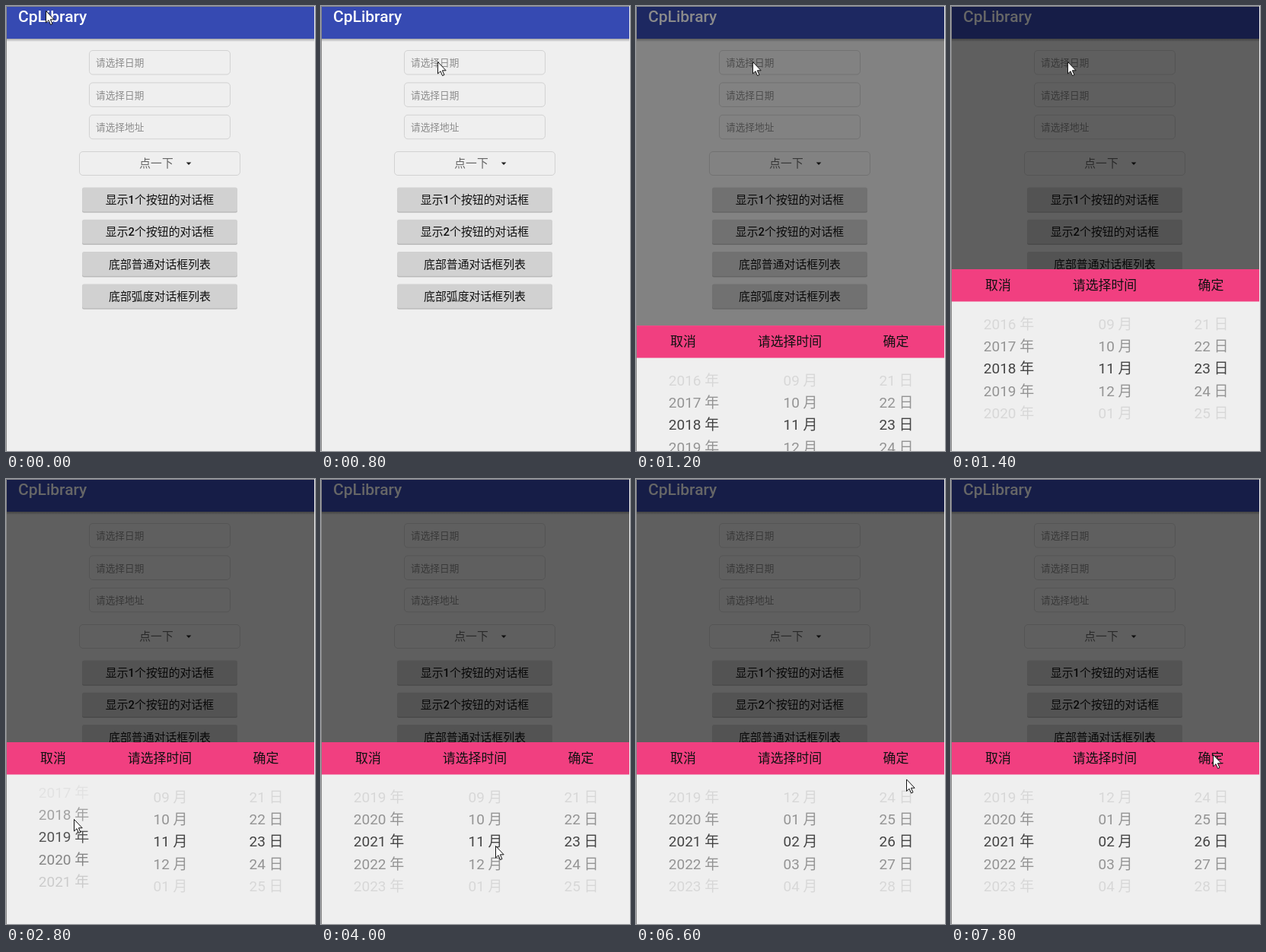
These frames come from a looping animation (406 px wide and 585 px high, 8 s). An HTML page:

```html
<!DOCTYPE html>
<html lang="zh">
<head>
<meta charset="utf-8">
<style>
html, body { margin: 0; width: 100%; height: 100%; overflow: hidden; background: #efefef; }
svg { display: block; width: 406px; height: 585px; }
text { font-family: Roboto, "Noto Sans CJK SC", "Noto Sans CJK", sans-serif; white-space: pre; }
</style>
</head>
<body>
<svg viewBox="0 0 406 585">
  <defs>
    <linearGradient id="shade" x1="0" y1="0" x2="0" y2="1">
      <stop offset="0" stop-color="#000" stop-opacity=".3"/>
      <stop offset="1" stop-color="#000" stop-opacity="0"/>
    </linearGradient>
    <clipPath id="body"><rect y="388" width="406" height="197"/></clipPath>
  </defs>
  <rect width="406" height="585" fill="#efefef"/>
  <g id="page"></g>
  <rect id="dim" width="405" height="584"/>
  <g id="panel">
    <rect y="346" width="405" height="239" fill="#efefef"/>
    <rect y="346" width="405" height="42.5" fill="#f13f80"/>
    <g id="head"></g>
    <g id="rows" clip-path="url(#body)"></g>
  </g>
  <path d="M.5 585V.5H405" fill="none" stroke="#888"/>
  <path d="M405.5 0V585" stroke="#efefef"/>
  <path id="cursor" d="M.5 .5V16L4 12.7L6.6 18.6L9 17.5L6.4 11.8H11.2Z" fill="#fff" stroke="#111"/>
</svg>
<script>
const LOOP = 8000, STEP = 200, ROW = 29.2, MID = 476.5;
const TURNS = 3, GRAB_Y = 482, REST = 200;
const $ = id => document.getElementById(id);

function add(parent, tag, attrs, text) {
  const el = document.createElementNS('http://www.w3.org/2000/svg', tag);
  for (const k in attrs) el.setAttribute(k, attrs[k]);
  if (text) el.textContent = text;
  return parent.appendChild(el);
}

// Text centred vertically on cy
function label(parent, text, x, cy, size, fill, anchor = 'middle', weight = 400) {
  return add(parent, 'text', {
    x, y: cy + size * 0.35, 'font-size': size, fill, 'text-anchor': anchor, 'font-weight': weight
  }, text);
}

function box(x, y, width, height) {
  add(page, 'rect', { x, y, width, height, rx: 4.5, fill: 'none', stroke: '#d2d2d2' });
}

const page = $('page');
add(page, 'rect', { width: 406, height: 43, fill: '#364ab2' });
add(page, 'rect', { y: 43, width: 406, height: 4, fill: 'url(#shade)' });
label(page, 'CpLibrary', 16, 14, 21, '#fff', 'start', 500);

['请选择日期', '请选择日期', '请选择地址'].forEach((s, i) => {
  const y = 58.5 + i * 42.4;
  box(109.5, y, 185, 31.5);
  label(page, s, 118, y + 16.3, 12.7, '#8c8c8c', 'start');
});

box(96.5, 191.5, 211, 31);
label(page, '点一下', 197.5, 207, 14.8, '#666');
add(page, 'path', { d: 'M236.8 205.5h6.6l-3.3 3.4z', fill: '#222' });

['显示1个按钮的对话框', '显示2个按钮的对话框', '底部普通对话框列表', '底部弧度对话框列表'].forEach((s, i) => {
  const y = 238.5 + i * 42.3;
  add(page, 'rect', { x: 100, y: y + 1.3, width: 204, height: 32, rx: 2.5, fill: '#bababa' });
  add(page, 'rect', { x: 100, y, width: 204, height: 31.8, rx: 2.5, fill: '#d1d1d1' });
  label(page, s, 202, y + 16.2, 14.9, '#111', 'middle', 500);
});

const head = (s, x) => label($('head'), s, x, 367.5, 16.9, '#111');
head('取消', 62);
head('请选择时间', 202);
head('确定', 341.5);

const pad = n => String(n).padStart(2, '0');
const wheels = [
  { x: 76, from: 2400, to: 3400, text: k => 2018 + k + ' 年' },
  { x: 216, from: 4000, to: 5200, text: k => pad((k + 22) % 12 + 1) + ' 月' },
  { x: 342, from: 6000, to: 6600, text: k => pad(23 + k) + ' 日' }
];
for (const w of wheels) {
  w.rows = Array.from({ length: 7 }, () => label($('rows'), '', w.x, 0, 19, '#444'));
}

const ramp = (t, from, to) => Math.min(1, Math.max(0, (t - from) / (to - from)));
const smooth = u => u * u * (3 - 2 * u);

// Glide to the field, drag each wheel up in turn, end on the confirm label
function cursorAt(t) {
  let x = 52, y = 6, free = 1400;
  const go = (from, to, nx, ny, bend = 1) => {
    const u = ramp(t, from, to);
    x += (nx - x) * u;
    y += (ny - y) * u ** bend;
  };
  go(0, 800, 153, 73);
  for (const w of wheels) {
    go(free, w.from, w.x + 13, GRAB_Y, 2);
    go(w.from, w.to, w.x + 13, GRAB_Y - TURNS * ROW);
    free = w.to + REST;
  }
  go(free, 7800, 344, 362);
  return `${x} ${y}`;
}

function drawWheel(w, t) {
  const pos = TURNS * ramp(t, w.from, w.to), near = Math.round(pos);
  w.rows.forEach((row, i) => {
    const k = near + i - 3, d = k - pos;
    row.textContent = w.text(k);
    row.setAttribute('y', MID + d * ROW + 6.8);
    row.setAttribute('opacity', Math.max(0, 1 - Math.abs(d) / 2.5) ** 1.25);
  });
}

function draw(t) {
  $('dim').setAttribute('opacity', 0.6 * smooth(ramp(t, 850, 1360)));
  $('panel').setAttribute('transform', `translate(0 ${239 * (1 - ramp(t, 1000, 1400)) ** 1.69})`);
  wheels.forEach(w => drawWheel(w, t));
  $('cursor').setAttribute('transform', `translate(${cursorAt(t)})`);
}

const start = performance.now();
function tick() {
  const t = (performance.now() - start) % LOOP;
  draw(Math.floor(t / STEP) * STEP);
  requestAnimationFrame(tick);
}
tick();
</script>
</body>
</html>
```
